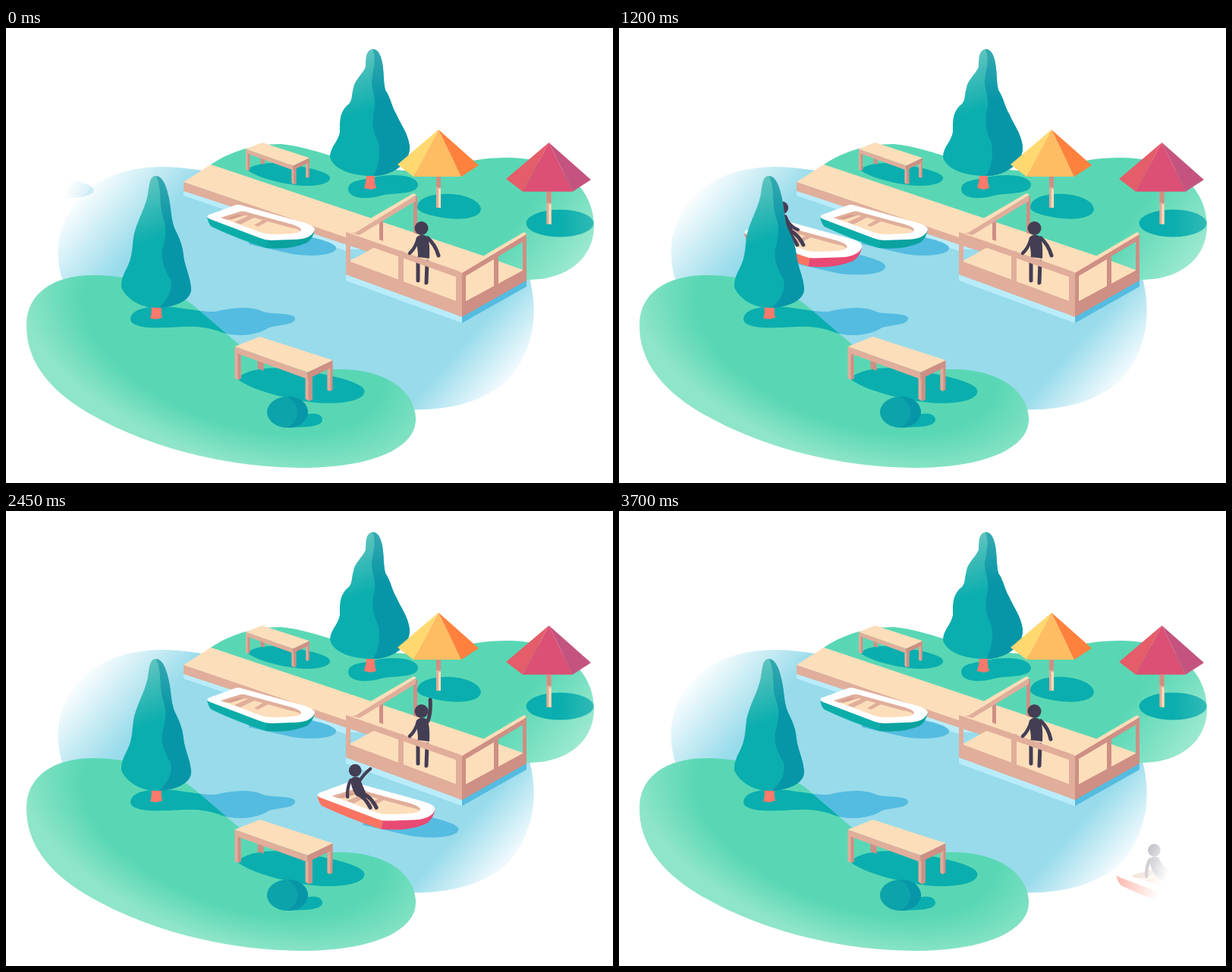
An HTML page without scripts that plays this animation: 800x600 px, repeating every 3.75 s.

```html
<!DOCTYPE html>
<html lang="en">
<head>
<meta charset="utf-8">
<title>Boat passing a pier</title>
<style>
  html, body { margin: 0; width: 100%; height: 100%; overflow: hidden; background: #fff; }
  svg { display: block; width: 800px; height: 600px; }
  .top { fill: #fddeba; }
  .front { fill: #e0ae9b; }
  .side { fill: #ce8f84; }
  .teal { fill: #0aaeae; }
  .deep { fill: #0796a7; }
  .trunk { fill: #fc7a6c; }
  .ripple { fill: #54bce0; }
  .foam { fill: #b9ecfb; }
  .person { fill: #443e54; }
  .limb { fill: none; stroke: #443e54; stroke-width: 5; stroke-linecap: round; stroke-linejoin: round; }
  .thin { stroke-width: 4.3; }
</style>
</head>
<body>
<svg viewBox="0 0 800 600">
  <defs>
    <linearGradient id="water" gradientUnits="userSpaceOnUse" x1="161" y1="142" x2="604" y2="531">
      <stop stop-color="#fff"/>
      <stop offset=".18" stop-color="#98dbeb"/>
      <stop offset=".87" stop-color="#98dbeb"/>
      <stop offset="1" stop-color="#f4fbfe"/>
    </linearGradient>
    <linearGradient id="farGrass" gradientUnits="userSpaceOnUse" x1="660" y1="235" x2="755" y2="310">
      <stop offset=".2" stop-color="#59d7b4"/>
      <stop offset="1" stop-color="#9ce9d0"/>
    </linearGradient>
    <radialGradient id="nearGrass" gradientUnits="userSpaceOnUse" cx="0" cy="0" r="1"
      gradientTransform="translate(300 410) rotate(20) scale(298 157)">
      <stop offset=".7" stop-color="#59d7b4"/>
      <stop offset="1" stop-color="#8fe5c9"/>
    </radialGradient>
    <linearGradient id="farShade">
      <stop offset=".5" stop-color="#0aaeae"/>
      <stop offset="1" stop-color="#30bab6"/>
    </linearGradient>
    <linearGradient id="leaf" x1=".3" y1="0" x2=".5" y2="1">
      <stop stop-color="#66c6c0"/>
      <stop offset=".5" stop-color="#0aaeae"/>
    </linearGradient>
    <linearGradient id="leafShade" x1="0" y1="0" x2="0" y2="1">
      <stop stop-color="#35a9b1"/>
      <stop offset=".4" stop-color="#0796a7"/>
    </linearGradient>
    <linearGradient id="fade" gradientUnits="userSpaceOnUse" x1="143.5" y1="61.7" x2="784.8" y2="337.5">
      <stop stop-color="#000"/>
      <stop offset=".18" stop-color="#fff"/>
      <stop offset=".83" stop-color="#fff"/>
      <stop offset="1" stop-color="#000"/>
    </linearGradient>
    <mask id="haze" maskUnits="userSpaceOnUse" x="0" y="0" width="800" height="600">
      <rect width="800" height="600" fill="url(#fade)"/>
    </mask>

    <path id="shore" d="M27 393C26 350 63 325 118 326C170 327 215 342 246 365L302 413C335 441 385 451 440 450C505 450 540 482 540 516C540 556 478 580 388 580C293 580 184 553 104 505C53 474 27 436 27 393Z"/>
    <clipPath id="onLand"><use href="#shore"/></clipPath>
    <path id="treeShade" d="M164 384C165 371 183 368 202 367C228 367 248 374 276 374C296 369 322 366 339 374C350 378 381 375 381 383C381 392 360 391 347 395C330 406 302 408 283 401C272 396 255 393 240 394C215 394 200 397 180 394C170 392 164 389 164 384Z"/>

    <g id="bench">
      <path class="teal" d="M2 55C20 41 55 38 92 45C140 53 171 62 171 72C171 85 138 90 107 87C70 83 22 71 2 55Z"/>
      <path class="side" d="M30 28h8v17l-8-3zM122 38h7v32l-4 2-3-2z"/>
      <path class="front" d="M0 18h8v37l-3 2-5-2zM93 50h9v33l-4 2-5-3zM122 38h4v34l-4-2z"/>
      <path class="side" d="M4 20h4v35l-4 2zM97 54l5-2v31l-5 2z"/>
      <path class="front" d="M0 13L96 47V56L0 21Z"/>
      <path class="side" d="M96 47L129 31V40L96 56Z"/>
      <path class="top" d="M0 13L33 0L129 31L96 47Z"/>
    </g>

    <g id="parasol">
      <path class="front" d="M-3 60h6v43h-6z"/>
      <path class="top" d="M0 78h3v25h-3z"/>
      <path class="side" d="M-3 62h6v14h-6z"/>
      <path fill="var(--left)" d="M0 0L-54 46L-33 62Z"/>
      <path fill="var(--mid)" d="M0 0L-33 62H30Z"/>
      <path fill="var(--right)" d="M0 0L30 62L53 47Z"/>
    </g>

    <g id="boat">
      <path class="ripple" d="M55 45L138 43C160 48 171 53 170 58C168 67 135 69 112 65L55 52Z"/>
      <path fill="var(--port)" d="M0 16L80 44L77 57Q40 45 6 29Q2 26 0 16Z"/>
      <path fill="var(--bow)" d="M80 44L142 33Q140 44 132 50Q110 60 77 57Z"/>
      <path fill="#fff" d="M0 16Q1 13 6 12L36 1Q40-1 46 1L122 22Q142 27 142 33C139 42 129 46 112 46L84 47Q77 47 70 44L4 19Q1 18 0 16Z"/>
      <path class="top" d="M18 17L44 9Q48 8 53 10L112 26Q128 31 122 36Q116 39 86 39Q78 39 72 37Z"/>
      <path class="front" d="M18 17L44 9Q48 8 53 10L112 26Q127 31 123 35Q121 32 109 30L51 14L26 20ZM36 23L58 13L64 16L44 26ZM62 27L77 18L84 20L67 29Z"/>
      <path class="side" d="M26 18L41 13L46 15L31 20Z" opacity=".6"/>
    </g>
  </defs>

  <!-- Lake and far bank -->
  <path fill="url(#water)" d="M75 334C52 268 90 184 205 183Q225 183 260 188L600 310L690 330C703 380 694 428 660 466Q613 506 530 503L300 480Z"/>
  <path fill="url(#farGrass)" d="M262 186C290 164 325 153 362 153C410 157 455 184 525 188C575 190 600 171 660 171C730 170 775 210 775 262C774 305 738 333 686 332L600 330Z"/>
  <use href="#bench" transform="translate(316 151) scale(.65)"/>

  <path class="teal" d="M451 212C452 200 470 201 488 196C515 191 543 195 543 207C542 220 512 217 494 221C474 227 451 225 451 212Z"/>
  <path class="trunk" d="M475 192h11q-1 10 2 19l-7 2-9-2q3-9 3-19z"/>
  <path fill="url(#leaf)" d="M482 28C474 30 474 41 474 51C470 61 459 69 458 79C455 88 457 94 452 100C439 110 440 123 440 137C438 150 427 157 427 170C431 186 455 195 482 195C510 195 533 178 532 156C530 139 519 125 514 113C508 103 507 92 500 82C497 69 499 53 494 39C491 30 487 27 482 28Z"/>
  <path fill="url(#leafShade)" d="M483 28C491 28 494 36 496 46C498 58 497 70 500 82C507 92 508 103 514 113C519 125 530 139 532 156C533 178 510 195 484 195C492 182 494 162 490 149C483 136 482 124 485 108C489 92 482 83 482 70C483 55 489 42 483 28Z"/>

  <path class="teal" d="M542 235C545 222 565 218 588 219C612 221 626 230 626 240C623 251 600 254 575 250C553 246 541 242 542 235Z"/>
  <ellipse fill="url(#farShade)" cx="730" cy="257.500" rx="44.500" ry="18"/>
  <use href="#parasol" x="570" y="134" style="--left:#ffd970;--mid:#ffbd63;--right:#ff813d"/>
  <use href="#parasol" transform="translate(715.500 151) scale(1.045)" style="--left:#e45d69;--mid:#db5074;--right:#c4547f"/>

  <!-- Pier -->
  <path class="foam" d="M234 213L486 298L448 308V325L601 380V389L448 333V294L234 221Z"/>
  <path fill="#98dbeb" d="M454 292L486 292L454 306Z"/>
  <path class="ripple" d="M601 380L686 332V341L601 389Z"/>
  <path class="front" d="M234 203L486 288V298L234 215Z"/>
  <path class="top" d="M234 203L270 180L634 302L684 320L601 369L450 309L486 289Z"/>
  <path class="front" d="M448 306L601 363V381L448 325Z"/>
  <path class="side" d="M601 363L686 317V333L601 381Z"/>

  <path class="side" d="M492 253h5v28l-5-2zM537 222h5v50l-5-2z"/>
  <path class="front" d="M454 270L540 221V228L466 273Z"/>
  <path class="top" d="M448 270L537 218L541 220L460 270Z"/>

  <g class="person">
    <circle cx="547.500" cy="264" r="9"/>
    <path d="M541 276Q547 270 555 275Q559 282 558 304L543 302Q543 290 540 282Z"/>
    <path class="limb" d="M543 304V333M555 308L554 336"/>
  </g>
  <path class="limb" d="M556 277Q566 286 570 300">
    <animate attributeName="d" dur="3750ms" repeatCount="indefinite"
      keyTimes="0;.36;.413;.448;.48;.533;.653;.68;.705;.745;1"
      values="M556 277Q566 286 570 300;M556 277Q566 286 570 300;M556 277Q564 278 571 283;M556 277Q569 277 573 266;M556 277Q565 268 565 251;M556 277Q565 268 565 251;M556 277Q560 266 559 249;M556 277Q565 268 565 251;M556 277Q566 277 572 281;M556 277Q565 287 568 301;M556 277Q566 286 569 301"/>
  </path>

  <path class="front" d="M448 269L601 322V331L454 279V325H448ZM517 294h7v50l-7-3zM593 321h8v60l-8-3z"/>
  <path class="side" d="M601 322L686 271V333H681V282L649 301V346H643V305L606 327V378L601 381Z"/>
  <path class="top" d="M596 320L683 269L686 272L601 323Z"/>
  <path class="limb thin" d="M543 278Q539 291 532 297"/>

  <!-- Boats -->
  <use href="#boat" x="265" y="233" style="--port:#0cada9;--bow:#0aa29f"/>
  <g mask="url(#haze)">
    <g>
      <animateTransform attributeName="transform" type="translate" from="-70.700 151" to="665 466.400" dur="3750ms" repeatCount="indefinite"/>
      <use href="#boat" transform="scale(1.095)" style="--port:#fb7462;--bow:#e84a73"/>
      <g class="person" transform="translate(50 -15)">
        <circle r="8.300"/>
        <path d="M-6 11Q0 6 6 10Q9 18 14 29Q10 36 1 33Q-6 22-6 11Z"/>
        <path class="limb thin" d="M-6 13Q-11 23-10 35"/>
        <path class="limb" d="M3 31Q13 35 20 49M10 30Q22 36 28 49"/>
        <path class="limb thin" d="M5 13Q10 25 21 29">
          <animate attributeName="d" dur="3750ms" repeatCount="indefinite"
            keyTimes="0;.42;.46;.5;.667;.7;.74;1"
            values="M5 13Q10 25 21 29;M5 13Q10 25 21 29;M5 13Q13 18 23 13;M5 15Q12 4 20-2;M5 15Q12 4 20-2;M5 13Q13 18 23 13;M5 13Q10 25 21 29;M5 13Q10 25 21 29"/>
        </path>
      </g>
    </g>
  </g>

  <!-- Near bank -->
  <use class="ripple" href="#treeShade"/>
  <use href="#shore" fill="url(#nearGrass)"/>
  <g clip-path="url(#onLand)"><use class="teal" href="#treeShade"/></g>
  <path class="trunk" d="M191 366h14q-1 9 1 16l-8 2-8-1q3-8 1-17z"/>
  <path fill="url(#leaf)" d="M197 195C189 196 189 207 187 219C184 235 176 249 171 264C166 277 168 290 164 304C161 317 151 326 152 342C159 358 178 369 199 369C224 368 244 359 244 344C243 328 236 316 234 301C233 287 228 276 222 264C217 251 218 237 214 221C211 207 206 195 197 195Z"/>
  <path fill="url(#leafShade)" d="M198 195C206 196 211 207 214 221C218 237 217 251 222 264C228 276 233 287 234 301C236 316 243 328 244 344C244 359 224 368 201 369C212 360 220 347 217 332C210 319 204 309 206 292C211 274 212 263 207 250C201 232 206 213 198 195Z"/>

  <use href="#bench" x="301.500" y="407"/>
  <path class="teal" d="M375 520C387 508 417 503 417 517C416 527 390 526 371 527Z"/>
  <ellipse cx="371" cy="506.500" rx="27" ry="20.500" fill="#0ca3aa"/>
  <path class="deep" d="M371 486C389 486 398 496 398 508C396 518 388 527 371 527C389 517 388 497 371 486Z"/>
</svg>
</body>
</html>
```
